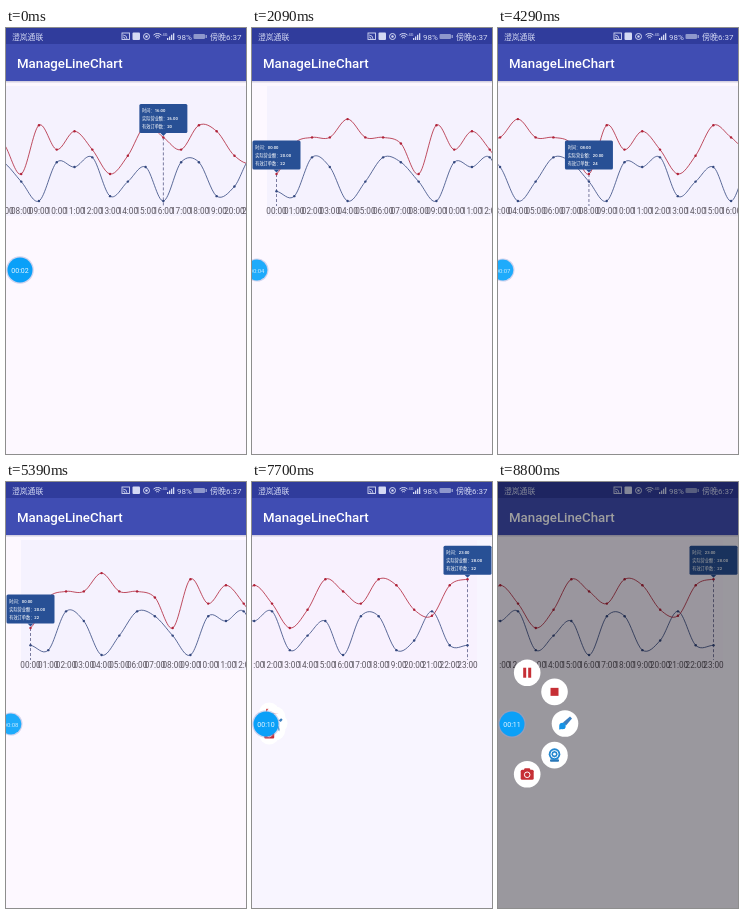
Recreate the animation shown at these times as an HTML page with a canvas. Size 240 by 426 pixels, loop 9020 ms.

```html
<!DOCTYPE html>
<html lang="zh">
<head>
<meta charset="utf-8">
<title>ManageLineChart</title>
<style>
  html, body { margin: 0; overflow: hidden; }
  canvas { display: block; }
</style>
</head>
<body>
<canvas id="stage" width="240" height="426"></canvas>
<script>
const ctx = document.getElementById('stage').getContext('2d');
const LOOP = 9020, TICK = 110;
const FONT = 'Roboto, "Noto Sans CJK SC", "Noto Sans CJK", sans-serif';
const RED = '#b02238', BLUE = '#34487f', ICON_RED = '#c62f35', SKY = '#0aa0f8';

const revenue = [20, 25, 26, 26, 29, 26, 26, 25, 20, 28, 24, 27, 24, 20, 23, 28, 26, 24, 28, 27, 23, 22, 27, 28];
const orders = [22, 21, 29, 27, 20, 24, 29, 28, 24, 20, 28, 27, 29, 21, 24, 27, 20, 28, 28, 21, 23, 29, 22, 22];
const STEP = 17.77;
const revenueY = v => 146 - (v - 20) * 6.1;
const ordersY = v => 173 - (v - 20) * 4.85;

// Selected hour over time
const drag = [[0, 16], [770, 16], [2050, 0], [2150, 0], [3190, 13.2], [3540, 17], [4290, 8], [5250, 0], [5400, 0], [6710, 23], [LOOP, 23]];

const clamp = x => Math.max(0, Math.min(1, x));
const mix = (a, b, u) => a + (b - a) * u;
const ramp = (t, from, to) => clamp((t - from) / (to - from));
const easeOut = u => 1 - (1 - u) ** 2;

function track(keys, t) {
  const i = Math.max(1, keys.findIndex(k => k[0] >= t));
  const [a, b] = [keys[i - 1], keys[i]];
  return mix(a[1], b[1], ramp(t, a[0], b[0]));
}

function rect(x, y, w, h, color, r = 0) {
  ctx.fillStyle = color;
  ctx.beginPath();
  ctx.roundRect(x, y, w, h, r);
  ctx.fill();
}

function disc(x, y, r, color) {
  ctx.fillStyle = color;
  ctx.beginPath();
  ctx.arc(x, y, r, 0, 7);
  ctx.fill();
}

function poly(points, color) {
  ctx.fillStyle = color;
  ctx.beginPath();
  points.forEach(p => ctx.lineTo(...p));
  ctx.fill();
}

function ring(x, y, r, color, width = 1, from = 0, to = 7) {
  ctx.strokeStyle = color;
  ctx.lineWidth = width;
  ctx.beginPath();
  ctx.arc(x, y, r, from, to);
  ctx.stroke();
}

function text(str, x, y, size, color, align = 'left', weight = 400) {
  ctx.font = `${weight} ${size}px ${FONT}`;
  ctx.textAlign = align;
  ctx.fillStyle = color;
  ctx.fillText(str, x, y);
}

function header() {
  const pale = '#d5daf4', dim = '#8e97cc';
  rect(0, 53, 240, 1.5, 'rgba(70,70,120,.22)');
  rect(0, 0, 240, 16, '#303c9c');
  rect(0, 16, 240, 37, '#404db3');
  text('ManageLineChart', 11, 40, 13.25, '#fff', 'left', 500);
  text('澄岚通联', 6, 11.5, 7.8, pale);

  ctx.strokeStyle = pale;
  ctx.lineWidth = .9;
  ctx.strokeRect(116, 5, 7.5, 6.5);
  for (const r of [2, 4]) ring(117, 11, r, pale, .8, -1.57, 0);
  rect(126.5, 4.5, 7.5, 7.5, pale, 1);
  ring(140.5, 8.5, 3, pale);
  disc(140.5, 8.5, 1.2, pale);
  for (const r of [2, 4, 6]) ring(151.5, 11.5, r, pale, 1, -2.3, -.84);
  text('4G', 156.5, 8, 4, pale);
  for (let i = 0; i < 4; i++) rect(161 + i * 2, 10 - i * 1.6, 1.3, 2 + i * 1.6, pale);
  text('98%', 171, 11.5, 8, pale);
  rect(187.5, 6, 11.5, 5, dim, 1);
  rect(199.5, 7, 1.5, 3, dim);
  text('傍晚6:37', 204, 11.5, 8, pale);
}

function series(values, toY, originX, color) {
  const x = i => originX + i * STEP;
  const y = i => toY(values[Math.max(0, Math.min(23, i))]);
  const slope = i => (y(i + 1) - y(i - 1)) / 6;
  ctx.strokeStyle = color;
  ctx.lineWidth = .8;
  ctx.beginPath();
  ctx.moveTo(x(0), y(0));
  for (let i = 1; i < 24; i++)
    ctx.bezierCurveTo(x(i - 2 / 3), y(i - 1) + slope(i - 1), x(i - 1 / 3), y(i) - slope(i), x(i), y(i));
  ctx.stroke();
  values.forEach((v, i) => disc(x(i), toY(v), 1.2, color));
}

const hour = i => String(i).padStart(2, '0') + ':00';

function chart(pos, background) {
  const tipX = 24.5 + pos * 191 / 23;
  const originX = tipX - pos * STEP;
  rect(originX - 9.5, 58, STEP * 23 + 19, 130, background);
  for (let i = 0; i < 24; i++) text(hour(i), originX + i * STEP, 186, 8.2, '#5c5660', 'center');

  const low = Math.floor(pos), near = Math.round(pos);
  const tipY = revenueY(mix(revenue[low], revenue[Math.min(23, low + 1)], pos - low));
  // The guide line shows only when the tooltip rests on a point
  if (Math.abs(pos - near) < .1) {
    ctx.strokeStyle = '#5a5c88';
    ctx.lineWidth = .8;
    ctx.setLineDash([3, 2]);
    ctx.beginPath();
    ctx.moveTo(tipX, tipY);
    ctx.lineTo(tipX, 178);
    ctx.stroke();
    ctx.setLineDash([]);
  }

  series(orders, ordersY, originX, BLUE);
  series(revenue, revenueY, originX, RED);

  const left = tipX - 24, top = tipY - 33.5;
  rect(left, top, 48, 29, '#285095', 1.5);
  poly([[tipX - 3, top + 29], [tipX + 3, top + 29], [tipX, top + 32]], '#285095');
  [`时间：${hour(near)}`, `实际营业额：${revenue[near]}.00`, `有效订单数：${orders[near]}`]
    .forEach((line, i) => text(line, left + 2.7, top + 8 + i * 8, 4.2, '#fff', 'left', 500));
}

const icons = [
  () => {
    rect(-4, -5, 3, 10, ICON_RED);
    rect(1, -5, 3, 10, ICON_RED);
  },
  () => rect(-4, -4, 8, 8, ICON_RED),
  () => {
    poly([[5, -7], [7, -5], [1, 2], [-2, -1]], '#3b7fc0');
    disc(-2.5, 2.5, 3.2, '#1593e6');
    poly([[-6, 6], [-5, 1], [0, 5]], '#1593e6');
  },
  () => {
    rect(-4.5, 4, 9, 2.5, '#2a78b8', 1);
    disc(0, -1, 5.8, '#2488d0');
    ring(0, -1, 3.6, '#fff');
    disc(0, -1, 1.4, '#fff');
  },
  () => {
    rect(-3, -6, 6, 4, ICON_RED, 1);
    rect(-6.5, -4.5, 13, 10, ICON_RED, 1.5);
    ring(0, .5, 2.8, '#fff');
  }
];

function menu(open, cx, cy) {
  icons.forEach((icon, i) => {
    const angle = (i - 2) * .64;
    const size = .7 + .3 * open;
    ctx.save();
    ctx.translate(cx + Math.cos(angle) * 53 * open, cy + Math.sin(angle) * 53 * open);
    ctx.scale(size, size);
    disc(0, 0, 13.3, '#fff');
    icon();
    ctx.restore();
  });
}

function timerButton(t) {
  const docked = ramp(t, 0, 550) * (1 - ramp(t, 6930, 7150));
  const x = mix(14, 5, docked), y = 242;
  disc(x, y, mix(13.8, 11.5, docked), 'rgba(150,165,215,.45)');
  disc(x, y, mix(12.5, 10.4, docked), docked > .5 ? '#1eabfb' : SKY);
  const seconds = Math.floor((t + 2730) / 1000);
  text('00:' + String(seconds).padStart(2, '0'), x, y + 2.5, mix(7, 6, docked), docked > .5 ? '#c8eaff' : '#e8f6ff', 'center');
}

function draw(t) {
  const late = t >= 7370;
  rect(0, 0, 240, 426, late ? '#f8f5ff' : '#fdf8ff');
  chart(track(drag, t), late ? '#f8f1fe' : '#f5f2fe');
  header();
  rect(0, 0, 240, 426, `rgba(0,0,0,${.38 * ramp(t, 7700, 8250)})`);
  const open = easeOut(ramp(t, 7640, 8170));
  if (open > 0) menu(open, 14, 241.5);
  timerButton(t);
}

function frame(now) {
  draw(Math.floor(now % LOOP / TICK) * TICK);
  requestAnimationFrame(frame);
}
requestAnimationFrame(frame);
</script>
</body>
</html>
```
